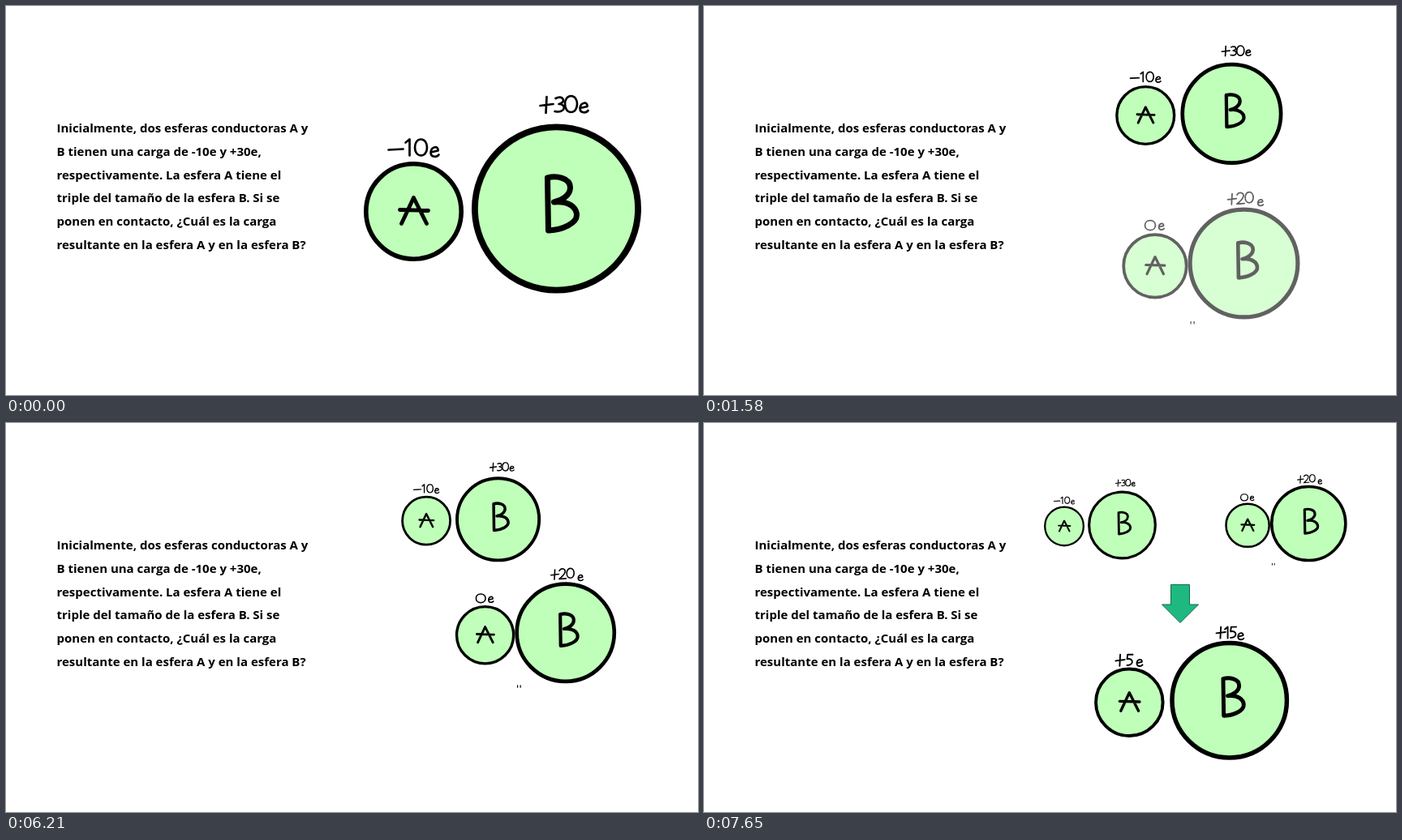
Recreate the animation shown at these times as an HTML page. Size 853 px wide and 480 px high, loop 8000 ms.

```html
<!DOCTYPE html>
<html lang="es">
<head>
<meta charset="utf-8">
<title>Carga de dos esferas</title>
<style>
  html, body { margin: 0; width: 100%; height: 100%; overflow: hidden; background: #fff; }
  svg { display: block; width: 100%; height: 100%; }
  text { font: bold 15px "Open Sans", "Noto Sans", sans-serif; }
  .pair { fill: none; stroke: #000; stroke-linecap: round; stroke-linejoin: round; }
</style>
</head>
<body>
<svg id="stage" viewBox="0 0 853 480"></svg>
<script>
const stage = document.getElementById('stage');

const lines = [
  'Inicialmente, dos esferas conductoras A y',
  'B tienen una carga de -10e y +30e,',
  'respectivamente. La esfera A tiene el',
  'triple del tamaño de la esfera B. Si se',
  'ponen en contacto, ¿Cuál es la carga',
  'resultante en la esfera A y en la esfera B?'
];

// Handwritten strokes, about 20 units high and centred on 0,0
const glyphs = {
  '-': 'M-9 1L9 0',
  '+': 'M-8 1L8 -1M0 -10L-1 10',
  '0': 'M0 -10C-10 -10 -10 10 0 10C10 10 10 -10 0 -10',
  'O': 'M0 -9C-13 -9 -13 9 0 9C13 9 13 -9 0 -9',
  '1': 'M-4 -6L1 -10V10',
  '2': 'M-7 -7C-3 -14 7 -11 5 -4C3 2 -3 7 -7 10L7 9',
  '3': 'M-5 -8C4 -13 9 -3 -1 -1C9 -1 7 11 -6 8',
  '5': 'M5 -10H-4L-5 -2C6 -5 8 9 -5 9',
  'e': 'M-5 1L4 -1C5 -7 -4 -7 -5 1C-5 8 3 7 5 4'
};

// Each label is a string plus the x, y of every character
const label = (text, spots) => [...text].map((c, i) =>
  `<path d="${glyphs[c]}" stroke-width="2.7" transform="translate(${spots[i]})"/>`).join('');

// Two spheres around the centre of B; A sits "gap" to its left
const pair = (id, gap, dy, labelA, labelB, extra = '') => `
  <g id="${id}" class="pair">${extra}
    <g transform="translate(${-gap} ${dy})">
      <circle r="58.7" fill="#bfffb9" stroke-width="5.6"/>
      <path d="M-15 15L0 -17L16 15M-17 -2L18 -1" stroke-width="4.8"/>${labelA}
    </g>
    <circle r="100.6" fill="#bfffb9" stroke-width="7.8"/>
    <path d="M-11 -38L-10 27M-11 -38C0 -41 17 -38 17 -26C17 -16 6 -10 -3 -8C14 -10 25 -2 25 8C25 18 8 26 -9 27" stroke-width="7"/>${labelB}
  </g>`;

const backing = `<path d="M-243 -93H-100V115H-243Z" fill="#fff" stroke="none"/>
  <path d="M-99 109V113M-93 109V113" stroke-width="2"/>`;

stage.innerHTML =
  lines.map((s, i) => `<text x="62.5" y="${156 + 28.8 * i}">${s}</text>`).join('') +
  pair('first', 176, 3.5,
    label('-10e', [[-22, -77], [-6, -79], [9, -79], [26, -74]]),
    label('+30e', [[-12, -128], [4, -128], [18, -129], [34, -125]])) +
  pair('second', 166, 5,
    label('Oe', [[-9, -76], [12, -74]]),
    label('+20e', [[-22, -120], [-6, -121], [10, -123], [31, -114]]), backing) +
  pair('third', 175.5, 3.5,
    label('+5e', [[-16, -74], [1, -74], [18, -70]]),
    label('+15e', [[-15, -119], [-4, -119], [7, -119], [20, -113]])) +
  `<path id="arrow" d="M575.5 199.5H598.5V224H609.5L587 246.5L564.5 224H575.5Z" fill="#1eb980" stroke="#17694a"/>`;

const [first, second, third, arrow] =
  ['first', 'second', 'third', 'arrow'].map(id => document.getElementById(id));

// Positions as x, y, scale
const firstPlaces = [[678.5, 250, 1], [646.3, 115.7, .545], [515.5, 126, .406]];
const secondPlaces = [[665.5, 317.5, .66], [745.3, 124, .453]];

const clamp = v => Math.min(1, Math.max(0, v));
const mix = (a, b, p) => a.map((v, i) => v + (b[i] - v) * p);
const bezier = (a, b, s) => 3 * a * s * (1 - s) ** 2 + 3 * b * s * s * (1 - s) + s ** 3;

function ease(t) {
  let lo = 0, hi = 1;
  for (let i = 0; i < 24; i++) {
    const mid = (lo + hi) / 2;
    if (bezier(.26, .32, mid) < t) lo = mid; else hi = mid;
  }
  return bezier(.09, 1, hi);
}

// A morph advances in 31 steps of 60 ms
function morph(time, start) {
  const t = clamp((Math.floor((time - start) / 60) + 1) / 31);
  return t === 0 || t === 1 ? t : ease(t);
}

// New objects appear in the last third of the eased move
const fade = p => clamp(3 * p - 2);

function place(el, [x, y, s]) {
  el.setAttribute('transform', `translate(${x} ${y}) scale(${s})`);
}

function draw(now) {
  const time = now % 8000;
  const p = morph(time, 500), q = morph(time, 5850);
  place(first, mix(mix(firstPlaces[0], firstPlaces[1], p), firstPlaces[2], q));
  place(second, mix(secondPlaces[0], secondPlaces[1], q));
  second.setAttribute('opacity', fade(p));
  third.setAttribute('opacity', fade(q));
  arrow.setAttribute('opacity', fade(q));
  requestAnimationFrame(draw);
}

place(third, [647.7, 342.3, .703]);
draw(0);
</script>
</body>
</html>
```
